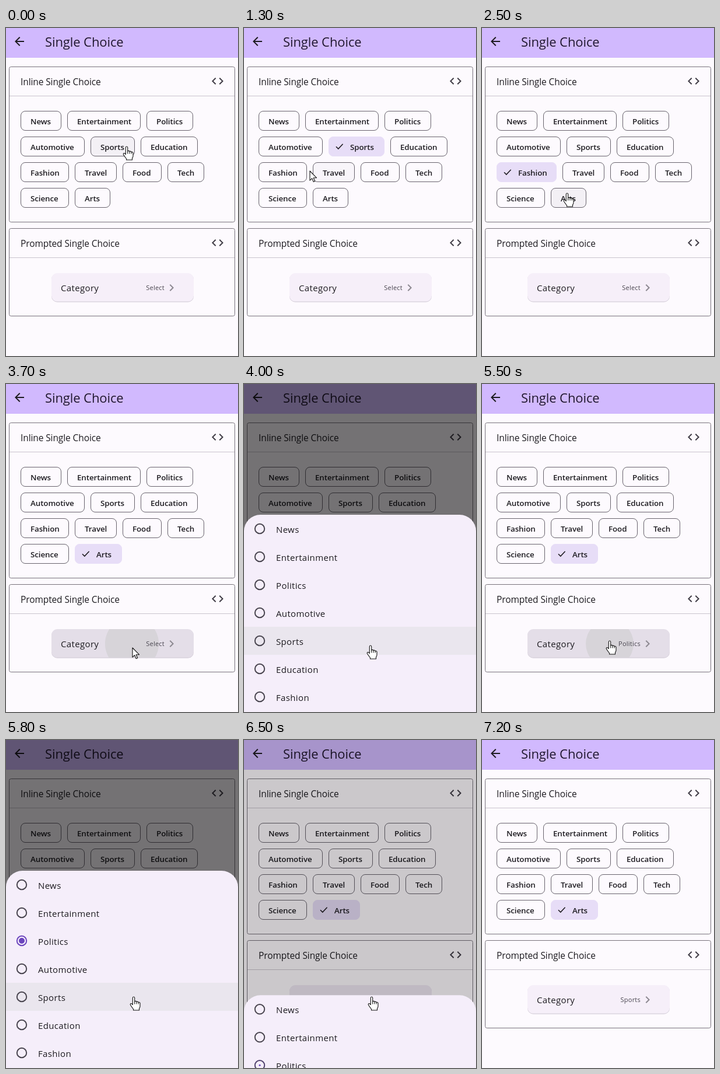
Recreate the animation shown at these times as an HTML page. Size 398 by 562 pixels, loop 8 s.

```html
<!DOCTYPE html>
<html lang="en">
<head>
<meta charset="utf-8">
<title>Single Choice</title>
<style>
  html, body { margin: 0; width: 100%; height: 100%; overflow: hidden; background: #fdfafe; }
  svg { display: block; width: 398px; height: 562px; }
  text { font-family: "Open Sans", "Noto Sans", sans-serif; fill: #1d1b20; white-space: pre; }
  .title { font-size: 22px; letter-spacing: -.1px; fill: #21182f; }
  .head { font-size: 15.5px; font-weight: 500; letter-spacing: -.1px; }
  .chip { font-size: 13.4px; font-weight: 600; letter-spacing: -.1px; }
  .item { font-size: 15px; letter-spacing: .35px; }
  .value { font-size: 11px; font-weight: 500; letter-spacing: .25px; fill: #49454f; text-anchor: end; }
</style>
</head>
<body>
<svg id="stage" viewBox="0 0 398 562"></svg>
<script>
const LOOP = 8000, STEP = 100, SHEET_TOP = 224, ROW = 48;
const CHIP_ROWS = [
  [["News", 70], ["Entertainment", 126], ["Politics", 80]],
  [["Automotive", 110], ["Sports", 76], ["Education", 98]],
  [["Fashion", 83], ["Travel", 72], ["Food", 67], ["Tech", 63]],
  [["Science", 83], ["Arts", 61]]
];
// Chip selections: name, start, end
const PICKS = { Sports: [600, 1600], Fashion: [1600, 2500], Arts: [2500, 9000] };
// Sheet: opening start, closing start, chosen row, row selected before
const SHEETS = [[3750, 4650, 2, -1], [5550, 6350, 4, 2]];
// Presses on the category button: start, centre x, growth in px per ms
const PRESSES = [[3520, 216, .256], [5370, 219, .315]];
// Pointer path: time, x, y, hand shape from here on
const POINTER = [
  [0, 207, 203, 1], [800, 207, 203, 1], [1000, 192, 224, 0], [1100, 172, 232, 1],
  [1200, 145, 240, 1], [1300, 113, 245, 0], [1400, 90, 241, 1], [1900, 90, 241, 1],
  [2200, 122, 262, 1], [2300, 132, 266, 0], [2400, 146, 283, 1], [2800, 146, 283, 1],
  [2900, 152, 312, 0], [3200, 196, 390, 0], [3400, 217, 452, 0], [3900, 217, 452, 1],
  [4200, 217, 440, 1], [4500, 231, 354, 1], [4900, 231, 354, 0], [5200, 219, 440, 1],
  [6700, 219, 440, 1], [6900, 300, 478, 0], [7100, 400, 520, 0], [8000, 400, 520, 0]
];
const CHECK = "M-6 .2L-2.2 4 5.6 -4.2";
const CODE = "M9.4 16.6L4.8 12l4.6-4.6L8 6l-6 6 6 6 1.4-1.4zm5.2 0l4.6-4.6-4.6-4.6L16 6l6 6-6 6-1.4-1.4z";
const BACK = "M20 11H7.83l5.59-5.59L12 4l-8 8 8 8 1.41-1.41L7.83 13H20v-2z";
const CHEVRON = "M10 6L8.59 7.41 13.17 12l-4.58 4.59L10 18l6-6z";
const ARROW = "M0 0V16.2L3.7 12.7 6.2 18.6 8.7 17.5 6.2 11.7H11.5Z";
const HAND = "M-1.7 2Q-1.7 0 0 0T1.7 2V8Q3.4 6.7 5 8.4Q6.8 7.4 8.2 9.4Q10.4 8.8 11 11V16Q11 18.5 9.5 20V23H-.5V21Q-3 18-5.5 14Q-6.3 12-4.6 11.5Q-3.2 11.4-1.7 13.6Z" +
  "M1.7 8V12.5M5 8.4V12.5M8.2 9.4V12.5";

const clamp = v => Math.max(0, Math.min(1, v));
const ramp = (t, start, length) => clamp((t - start) / length);
const mix = (a, b, k) => a + (b - a) * k;
const blend = (a, b, k) => `rgb(${a.map((v, i) => Math.round(mix(v, b[i], k)))})`;

function set(el, attrs) {
  for (const k in attrs) el.setAttribute(k, attrs[k]);
  return el;
}
function add(parent, tag, attrs, text) {
  const el = set(document.createElementNS("http://www.w3.org/2000/svg", tag), attrs);
  if (text) el.textContent = text;
  return parent.appendChild(el);
}
const box = (parent, x, y, width, height, attrs) => add(parent, "rect", { x, y, width, height, ...attrs });
const label = (parent, cls, x, y, text) => add(parent, "text", { class: cls, x, y }, text);
const icon = (parent, d, x, y, fill) => add(parent, "path", { d, fill, transform: `translate(${x} ${y})` });

const stage = document.getElementById("stage");

// Page
box(stage, 0, 0, 398, 562, { fill: "#fdfafe" });
box(stage, 0, 0, 398, 51, { fill: "#d1b9fe" });
icon(stage, BACK, 11, 11, "#1d1b20");
label(stage, "title", 67, 32, "Single Choice");

function card(y, h, title) {
  box(stage, 5.5, y + .5, 387, h, { rx: 3, fill: "none", stroke: "#77727b" });
  box(stage, 6, y + 50, 386, 1, { fill: "#c9c4cd" });
  label(stage, "head", 25, y + 32, title);
  icon(stage, CODE, 351, y + 13, "#3f3b45");
}
card(66, 266, "Inline Single Choice");
card(343, 150, "Prompted Single Choice");

const chipRows = CHIP_ROWS.map((row, r) => row.map(([name, w]) => {
  const g = add(stage, "g");
  const rect = box(g, .5, .5, w - 1, 33, { rx: 7.5 });
  const check = add(g, "path", {
    d: CHECK, transform: "translate(19 17)", fill: "none", stroke: "#1d1b20",
    "stroke-width": 1.6, pathLength: 1, "stroke-dasharray": "1 2"
  });
  return { name, w, y: 142 + r * 44, g, rect, check, text: label(g, "chip", 17, 23, name) };
}));

// Category button
const clip = add(add(stage, "defs"), "clipPath", { id: "button" });
box(clip, 78, 420, 244, 49, { rx: 10 });
box(stage, 78, 420.8, 244, 49, { rx: 10, fill: "#d6cfda" });
const button = box(stage, 78, 420, 244, 48.6, { rx: 10 });
const ripple = add(add(stage, "g", { "clip-path": "url(#button)" }), "circle", { cy: 445, fill: "#d7d4d9" });
label(stage, "item", 94, 451, "Category");
const value = label(stage, "value", 272, 449);
icon(stage, CHEVRON, 272, 433, "#8d8991");

// Bottom sheet
const scrim = box(stage, 0, 0, 398, 562, { fill: "#000" });
const sheet = add(stage, "g");
box(sheet, 0, 0, 398, 400, { rx: 28, fill: "#f5eefa" });
const hoverRow = box(sheet, 0, 0, 398, ROW);
const rows = CHIP_ROWS.flat().slice(0, 7).map(([name], i) => {
  const cy = i * ROW + 24;
  label(sheet, "item", 55, cy + 6.5, name);
  return {
    ring: add(sheet, "circle", { cx: 27, cy, r: 8.2, fill: "none", "stroke-width": 2 }),
    dot: add(sheet, "circle", { cx: 27, cy, fill: "#6b45bd" })
  };
});

const pointer = add(stage, "path", { fill: "#fff", stroke: "#111", "stroke-width": 1.1, "stroke-linejoin": "round" });

function pointerAt(t) {
  const i = Math.max(0, POINTER.findIndex(p => p[0] > t) - 1);
  const [t0, x0, y0, hand] = POINTER[i], [t1, x1, y1] = POINTER[i + 1];
  const k = (t - t0) / (t1 - t0);
  return { x: mix(x0, x1, k), y: mix(y0, y1, k), hand };
}
const inside = (p, x, y, w, h) => p.x >= x && p.x < x + w && p.y >= y && p.y < y + h;

function drawChips(t, now, before) {
  for (const row of chipRows) {
    let x = 25;
    for (const c of row) {
      const [on, off] = PICKS[c.name] || [9e3, 9e3];
      const k = ramp(t, on, 200) - ramp(t, off, 200);
      const w = c.w + 20 * k;
      const hover = Math.min(1, inside(now, x, c.y, w, 34) + .5 * inside(before, x, c.y, w, 34));
      set(c.g, { transform: `translate(${x} ${c.y})` });
      set(c.rect, {
        width: w - 1,
        fill: blend([253 - 10 * hover, 250 - 10 * hover, 254 - 9 * hover], [231, 221, 247], k),
        stroke: blend([104, 99, 109], [231, 221, 247], k)
      });
      set(c.check, { "stroke-dashoffset": 1 - k, opacity: k > 0 ? 1 : 0 });
      set(c.text, { x: 17 + 20 * k });
      x += w + 10;
    }
  }
}

function drawButton(t, now) {
  const press = PRESSES.find(([start]) => t > start && t < start + 600);
  const hover = t > 3000 && inside(now, 78, 420, 244, 49);
  set(button, { fill: press ? "#e4dee8" : hover ? "#eee7f2" : "#f6eff9" });
  set(ripple, press ? { cx: press[1], r: (t - press[0]) * press[2] } : { r: 0 });
  value.textContent = t < 4700 ? "Select" : t < 6400 ? "Politics" : "Sports";
}

function drawSheet(t, now) {
  const [open, close, chosen, previous] = SHEETS[t < 5500 ? 0 : 1];
  const shown = 1 - (1 - ramp(t, open, 250)) ** 2 - ramp(t, close, 200) ** 1.6;
  const top = mix(562, SHEET_TOP, shown);
  const closing = t > close;
  const over = closing ? chosen : Math.floor((now.y - top) / ROW);
  set(scrim, { opacity: .54 * shown });
  set(sheet, { transform: `translate(0 ${top})` });
  set(hoverRow, {
    x: closing ? 55 : 0, width: closing ? 312 : 398, y: over * ROW,
    fill: closing ? "#e3dfe7" : "#eae6ee", opacity: over < 0 ? 0 : 1
  });
  rows.forEach(({ ring, dot }, i) => {
    const picked = ramp(t, close + 10, 200);
    const k = i === chosen ? picked : i === previous ? 1 - picked : 0;
    set(ring, { stroke: blend([73, 69, 79], [107, 69, 189], k) });
    set(dot, { r: 5 * k });
  });
}

function draw(t) {
  const now = pointerAt(t);
  drawChips(t, now, pointerAt(Math.max(0, t - STEP)));
  drawButton(t, now);
  drawSheet(t, now);
  set(pointer, { d: now.hand ? HAND : ARROW, transform: `translate(${now.x} ${now.y})` });
}

const begin = performance.now();
function tick() {
  const t = (performance.now() - begin) % LOOP;
  draw(Math.floor(t / STEP) * STEP);
  requestAnimationFrame(tick);
}
tick();
</script>
</body>
</html>
```
